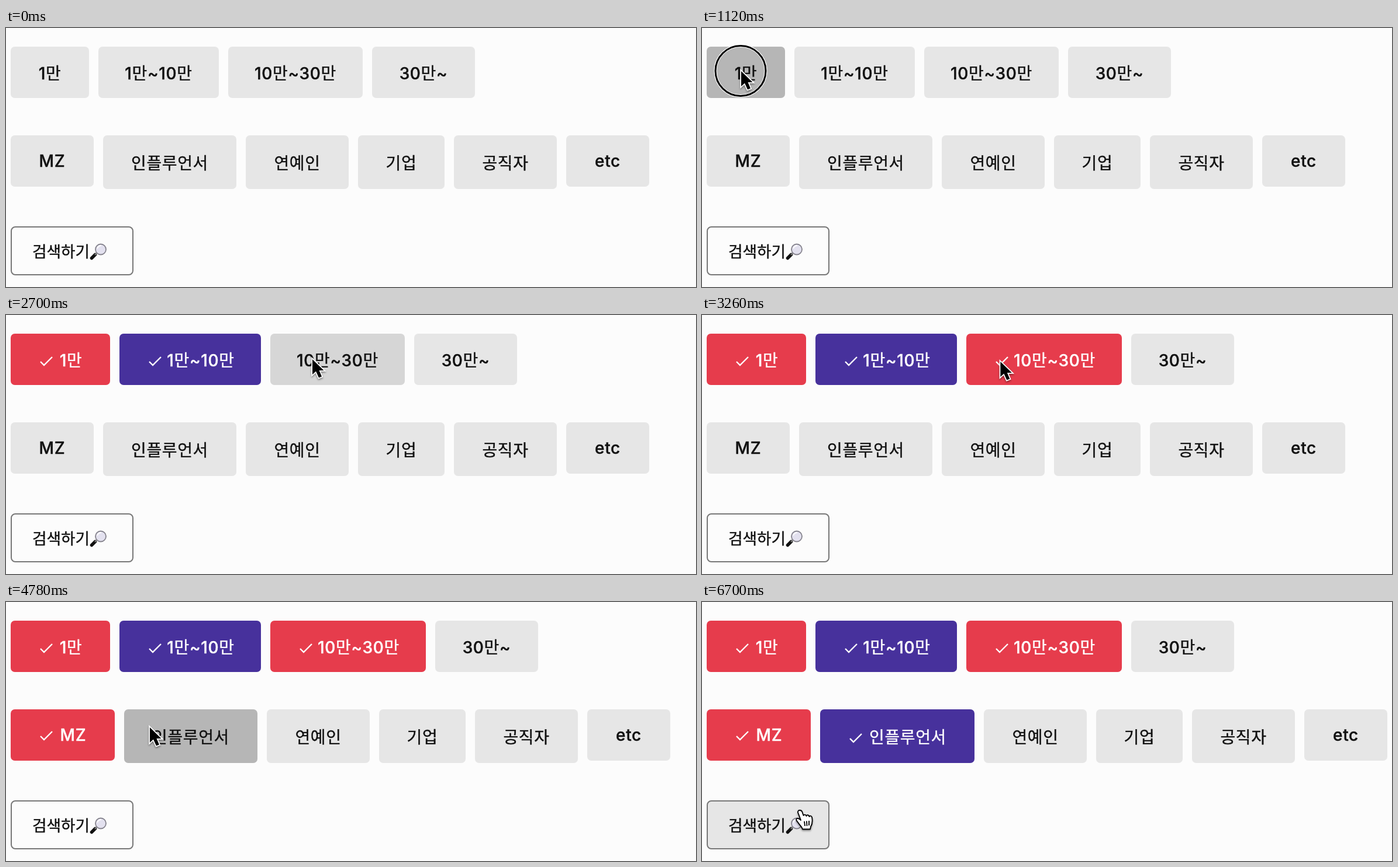
Animation, 1180 px wide and 444 px high, one loop 6720 ms. Source, as an HTML page:

```html
<!DOCTYPE html>
<html lang="ko">
<head>
<meta charset="utf-8">
<style>
  html, body { margin: 0; width: 100%; height: 100%; overflow: hidden; background: #fcfcfc; }
  svg { display: block; }
  text {
    font: 500 28px Inter, "Noto Sans CJK KR", "Noto Sans CJK", sans-serif;
    letter-spacing: .64px; text-anchor: middle;
    fill: #111; stroke: #111; stroke-width: .4px;
  }
  .on text { fill: #fff; stroke: #fff; }
  .check { fill: none; stroke: #fff; stroke-width: 2.4; visibility: hidden; }
  .on .check { visibility: visible; }
  #search text { font-size: 26.67px; letter-spacing: 0; text-anchor: start; }
  #arrow, #hand { filter: drop-shadow(0 2px 1.5px #0006); }
</style>
</head>
<body>
<svg width="1180" height="444" viewBox="0 0 1180 444">
  <g id="chips"></g>
  <g id="search">
    <rect id="button" x="9" y="341" width="208" height="82" rx="7" stroke="#777" stroke-width="2"/>
    <text x="45" y="393">검색하기</text>
    <path d="M146.500 394.500L152.500 388.500" stroke="#111" stroke-width="5.500" stroke-linecap="round"/>
    <path d="M152 389L156 385" stroke="#777" stroke-width="2.500"/>
    <circle cx="162" cy="379.500" r="9" fill="#e3e1ef" stroke="#85838d" stroke-width="1.800"/>
    <path d="M156 378Q158 373 163 373" fill="none" stroke="#fff" stroke-width="2"/>
  </g>
  <g id="cursor">
    <g id="ring" fill="none">
      <circle cx="1" cy="3.500" r="43" stroke="#fff" stroke-width="5"/>
      <circle cx="1" cy="3.500" r="43" stroke="#000" stroke-width="3"/>
    </g>
    <path id="arrow" d="M2 4V30L8 24.500L13 35.500L18 33.500L13.500 23H21.500Z"
      stroke="#fff" stroke-width="3.500" paint-order="stroke"/>
    <g id="hand" transform="translate(-7 0)" stroke="#000" stroke-width="1.800" stroke-linejoin="round">
      <path fill="#fff" d="M7 1C4 1 3.500 4 4.500 6L9 18C6 15 3 14 1.500 16C0 18 3 20 5 23C8 28 11 29 12 33.500H25L26 29C29 24 29 18 28 13C27 10 24 10 23.500 12C23 9 19 8 18.500 11C18 8 14 8 13.500 10L11 3C10 1 8.500 1 7 1Z"/>
      <path fill="none" d="M15 20L16 28M19 19.500L19.500 28M23 19L23 27"/>
    </g>
  </g>
</svg>
<script>
const LOOP = 6720, GAP = 16, CHECK = 36;
const RED = '#e63c4c', PURPLE = '#47319c';
const IDLE = '#e6e6e6', HOVER = '#d6d6d6', PRESSED = '#b6b6b6';
const $ = id => document.getElementById(id);

// label, width, height, baseline
const rows = [
  { y: 32, chips: [['1만', 134, 88, 56], ['1만~10만', 206, 88, 56], ['10만~30만', 230, 88, 56], ['30만~', 176, 88, 56]] },
  { y: 184, chips: [['MZ', 142, 88, 54], ['인플루언서', 228, 92, 58], ['연예인', 176, 92, 58],
    ['기업', 148, 92, 58], ['공직자', 176, 92, 58], ['etc', 142, 88, 54]] }
];
// time, x, y of the pointer tip
const path = [
  [280, 330, 452], [860, 65, 70], [1260, 65, 70], [1800, 300, 76], [2160, 300, 76],
  [2640, 522, 72], [3200, 522, 72], [3760, 108, 194], [4020, 108, 194],
  [4600, 244, 211], [4980, 244, 211], [5520, 170, 351], [5700, 170, 351], [5900, 167, 356]
];
// press, release, label of the chip it selects
const clicks = [
  [1060, 1200, '1만'], [1960, 2100, '1만~10만'], [2970, 3100, '10만~30만'],
  [3800, 3940, 'MZ'], [4770, 4900, '인플루언서'], [5960, 6100, '']
];

for (const row of rows) row.chips = row.chips.map(([label, width, height, base], i) => {
  const node = document.createElementNS('http://www.w3.org/2000/svg', 'g');
  node.innerHTML = `<rect height="${height}" rx="7"/>
    <path class="check" d="M51 ${base - 8}L57 ${base - 2}L71 ${base - 16}"/>
    <text y="${base}">${label}</text>`;
  $('chips').append(node);
  return { label, width, height, node, color: i % 2 ? PURPLE : RED,
    rect: node.querySelector('rect'), text: node.querySelector('text') };
});

function pointerAt(t) {
  const next = path.findIndex(p => p[0] > t);
  if (next < 1) return path.at(next).slice(1);
  const [t0, x0, y0] = path[next - 1], [t1, x1, y1] = path[next];
  const u = (t - t0) / (t1 - t0), e = u * u * (3 - 2 * u);
  return [x0 + (x1 - x0) * e, y0 + (y1 - y0) * e];
}

function draw(t) {
  const [px, py] = t < path[0][0] ? path[0].slice(1) : pointerAt(t);
  const inside = (x, y, w, h) => px >= x && px < x + w && py >= y && py < y + h;
  const press = clicks.find(([down, up]) => t >= down && t < up);
  const active = press ? PRESSED : HOVER;

  for (const { y, chips } of rows) {
    let x = 8;
    for (const chip of chips) {
      const on = clicks.some(([, up, label]) => label === chip.label && t >= up);
      const shift = on ? CHECK : 0, width = chip.width + shift;
      chip.node.setAttribute('transform', `translate(${x} ${y})`);
      chip.node.setAttribute('class', on ? 'on' : '');
      chip.rect.setAttribute('width', width);
      chip.rect.setAttribute('fill', on ? chip.color : inside(x, y, width, chip.height) ? active : IDLE);
      chip.text.setAttribute('x', chip.width / 2 + shift);
      x += width + GAP;
    }
  }

  const onButton = inside(8, 340, 210, 84);
  $('button').setAttribute('fill', !onButton ? '#fcfcfc' : press ? PRESSED : IDLE);
  $('cursor').setAttribute('transform', `translate(${px} ${py})`);
  $('arrow').style.display = onButton ? 'none' : '';
  $('hand').style.display = onButton ? '' : 'none';
  $('ring').style.display = t > path[0][0] && press && t >= press[0] + 30 ? '' : 'none';
}

function tick() {
  draw(performance.now() % LOOP);
  requestAnimationFrame(tick);
}
tick();
</script>
</body>
</html>
```
